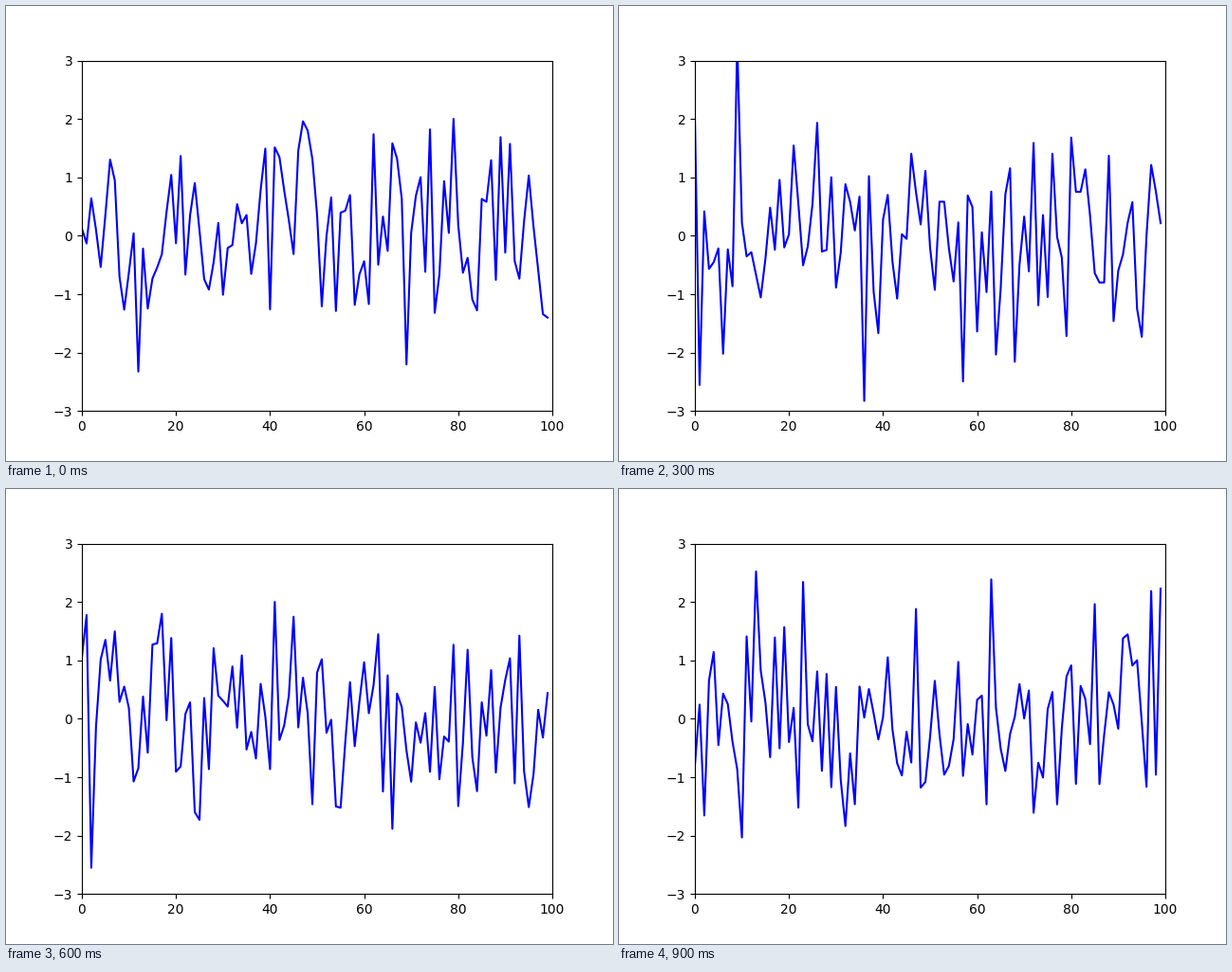
A matplotlib script for the animation above (1000 ms loop, 640 px wide and 480 px high).

```python
import numpy as np
import matplotlib.pyplot as plt
from matplotlib.animation import FuncAnimation

FRAMES, INTERVAL, POINTS = 10, 100, 100


def noise(step):
    """A fresh burst of standard normal noise, the same on every loop."""
    return np.random.default_rng(step).normal(size=POINTS)


fig, ax = plt.subplots(figsize=(6.4, 4.8), dpi=100)
ax.set(xlim=(0, 100), ylim=(-3, 3))
line, = ax.plot(np.arange(POINTS), noise(0), color="b", lw=1.5)


def update(step):
    line.set_ydata(noise(step))
    return line,


anim = FuncAnimation(fig, update, frames=FRAMES, interval=INTERVAL, repeat=True)
plt.show()
```
